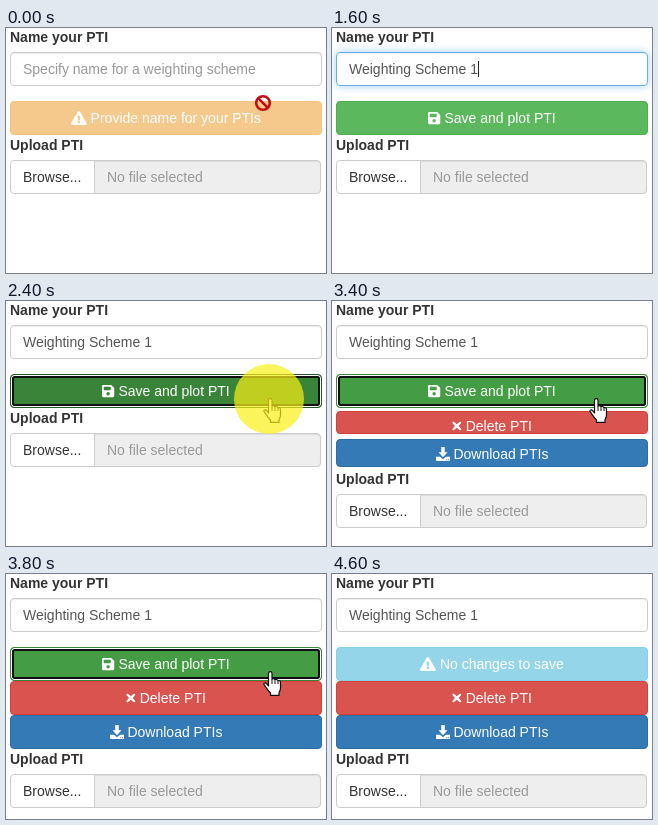
Recreate the animation shown at these times as an HTML page. Size 320 px wide and 245 px high, loop 5.4 s.

```html
<!DOCTYPE html>
<html lang="en">
<head>
<meta charset="utf-8">
<title>Saving a weighting scheme</title>
<style>
  html, body { margin: 0; width: 100%; height: 100%; overflow: hidden; background: #fff; }
  #stage {
    position: relative; width: 320px; height: 245px; overflow: hidden;
    font: 14px/20px "Liberation Sans", Arial, sans-serif; color: #333; white-space: pre;
  }
  #stage div, .cursor { position: absolute; box-sizing: border-box; }
  .label { left: 4px; font-weight: bold; }
  .field { left: 4px; top: 24px; width: 312px; height: 34px; padding: 6px 12px;
    border: 1px solid #ccc; border-radius: 4px; color: #555; box-shadow: inset 0 1px 1px rgba(0,0,0,.075); }
  .field.empty { color: #999; }
  .field.focus { border-color: #66afe9;
    box-shadow: inset 0 1px 1px rgba(0,0,0,.075), 0 0 8px rgba(102,175,233,.6); }
  .field.focus::after { content: ""; display: inline-block; width: 1px; height: 16px;
    background: #222; vertical-align: -3px; }
  .button { left: 4px; width: 312px; height: 34px; padding-top: 6px; overflow: hidden;
    border: 1px solid; border-radius: 4px; color: #fff; text-align: center; }
  .button svg { height: 14px; vertical-align: -1.75px; fill: #fff; fill-rule: evenodd; }
  .warning { background: #f0ad4e; border-color: #eea236; opacity: .65; }
  .info { background: #5bc0de; border-color: #46b8da; opacity: .65; }
  .success { background: #5cb85c; border-color: #4cae4c; }
  .pressed { background: #398439; border-color: #255625; }
  .focused { background: #449d44; border-color: #398439; }
  .pressed::after, .focused::after { content: ""; position: absolute; inset: 0;
    border: 2px solid #101010; border-radius: 3px; box-shadow: 0 0 0 1px #fff; margin: 1px; }
  .danger { background: #d9534f; border-color: #d43f3a; }
  .primary { background: #337ab7; border-color: #2e6da4; }
  #upload { left: 0; top: 0; }
  .browse { left: 4px; top: 132px; width: 85px; height: 34px; padding: 6px 12px;
    border: 1px solid #ccc; border-radius: 4px 0 0 4px; background: #fff; }
  .file { left: 88px; top: 132px; width: 227px; height: 34px; padding: 6px 12px;
    border: 1px solid #ccc; border-radius: 0 4px 4px 0; background: #eee; color: #999;
    box-shadow: inset 0 1px 1px rgba(0,0,0,.075); }
  .cursor { overflow: visible; }
  #halo { left: 228px; top: 63px; width: 70px; height: 70px; border-radius: 50%;
    background: rgba(250,239,20,.7); }
</style>
</head>
<body>
<div id="stage">
  <div class="label" style="top:-1px">Name your PTI</div>
  <div id="name"></div>
  <div id="save" style="top:73px"></div>
  <div id="remove" class="button danger"></div>
  <div id="download" class="button primary"></div>
  <div id="upload">
    <div class="label" style="top:107px">Upload PTI</div>
    <div class="browse">Browse...</div>
    <div class="file">No file selected</div>
  </div>
  <svg id="hand" class="cursor" style="left:257px;top:97px" width="19" height="26">
    <path fill="#fff" stroke="#111" stroke-width="1.2" stroke-linejoin="round"
      d="M5.5 15V2.5Q5.5.7 7.2.7T9 2.5V8Q10.5 6.8 12 8.6Q13.6 7.6 15 9.6Q17.5 9 17.5 12V17Q17.5 19.5 16 21.5V24.4H7.5V22Q5 19.5 3.2 16.6L.9 13.4Q.8 11.6 2.6 11.9Q4 12.5 5.5 15Z"/>
    <path stroke="#111" d="M9 8v5M12 8.6V13M15 9.6V13"/>
  </svg>
  <svg id="blocked" class="cursor" width="18" height="18">
    <g fill="none" stroke="#c40a14" stroke-width="2.6">
      <circle cx="9" cy="9" r="6.8"/><path d="M4.2 4.2 13.8 13.8"/>
    </g>
  </svg>
  <div id="halo"></div>
</div>
<script>
const LOOP = 5400;
const $ = id => document.getElementById(id);

// Icon width and outline on a 512-unit grid.
const icons = {
  alert: [576, "M569 440C588 472 565 512 528 512H48C11 512-12 472 6 440L246 24C265-8 311-8 330 24ZM288 354a46 46 0 1 0 0 92 46 46 0 0 0 0-92ZM244 189l8 136q1 11 12 11h48q11 0 12-11l8-136q0-13-12-13h-60q-12 0-12 13Z"],
  disk: [448, "M434 130 350 46Q336 32 316 32H48Q0 32 0 80V432Q0 480 48 480H400Q448 480 448 432V164Q448 144 434 130ZM224 416a64 64 0 1 1 0-128 64 64 0 0 1 0 128ZM320 111V212q0 12-12 12H76q-12 0-12-12V108q0-12 12-12H305Z"],
  cross: [352, "M56 88 176 194 296 88 344 136 243 256 344 376 296 424 176 318 56 424 8 376 109 256 8 136Z"],
  tray: [512, "M192 0H320V192H420L256 372 92 192H192ZM0 352H146L256 448 366 352H512V488Q512 512 488 512H24Q0 512 0 488ZM372 444h40v36h-40ZM440 444h40v36h-40Z"]
};

const caption = (icon, text) => {
  const [width, path] = icons[icon];
  return `<svg width="${width * 14 / 512}" viewBox="0 0 ${width} 512"><path d="${path}"/></svg> ${text}`;
};

const provide = ["warning", caption("alert", "Provide name for your PTIs")];
const saveText = caption("disk", "Save and plot PTI");
const noChanges = ["info", caption("alert", "No changes to save")];
const title = "Weighting Scheme 1";

// Sliding rows: [top, height, text inset]; shift moves the upload area.
const opening = { remove: [115, 6, 1], download: [133, 11, 1], shift: 40 };
const widening = { remove: [110, 23, 4], download: [138, 28, 4], shift: 61 };
const open = { remove: [107, 34, 6], download: [141, 34, 6], shift: 68 };

const steps = [
  { at: 0, save: provide, blocked: [248, 66] },
  { at: 800, name: "Weighting S", focus: true, save: provide },
  { at: 1600, name: title, focus: true, save: ["success", saveText] },
  { at: 2400, name: title, save: ["pressed", saveText], hand: true, halo: true },
  { at: 3000, name: title, save: ["focused", saveText], hand: true, ...opening },
  { at: 3400, name: title, save: ["focused", saveText], hand: true, ...widening },
  { at: 3800, name: title, save: ["focused", saveText], hand: true, ...open },
  { at: 4200, name: title, save: noChanges, blocked: [255, 89], ...open },
  { at: 4600, name: title, save: noChanges, ...open }
];

const show = (id, visible) => { $(id).style.display = visible ? "block" : "none"; };

function placeRow(id, row) {
  show(id, row);
  if (!row) return;
  const [top, height, inset] = row;
  Object.assign($(id).style, { top: top + "px", height: height + "px", paddingTop: inset + "px" });
}

function render(step) {
  const { name, focus, save: [style, html], blocked, shift = 0 } = step;
  $("name").className = `field ${name ? "" : "empty"} ${focus ? "focus" : ""}`;
  $("name").textContent = name || "Specify name for a weighting scheme";
  $("save").className = "button " + style;
  $("save").innerHTML = html;
  placeRow("remove", step.remove);
  placeRow("download", step.download);
  $("upload").style.top = shift + "px";
  show("hand", step.hand);
  show("halo", step.halo);
  show("blocked", blocked);
  if (blocked) Object.assign($("blocked").style, { left: blocked[0] + "px", top: blocked[1] + "px" });
}

$("remove").innerHTML = caption("cross", "Delete PTI");
$("download").innerHTML = caption("tray", "Download PTIs");

const start = performance.now();
let current;
function tick() {
  const time = (performance.now() - start) % LOOP;
  const step = steps.findLast(s => s.at <= time);
  if (step !== current) render(current = step);
  requestAnimationFrame(tick);
}
tick();
</script>
</body>
</html>
```
